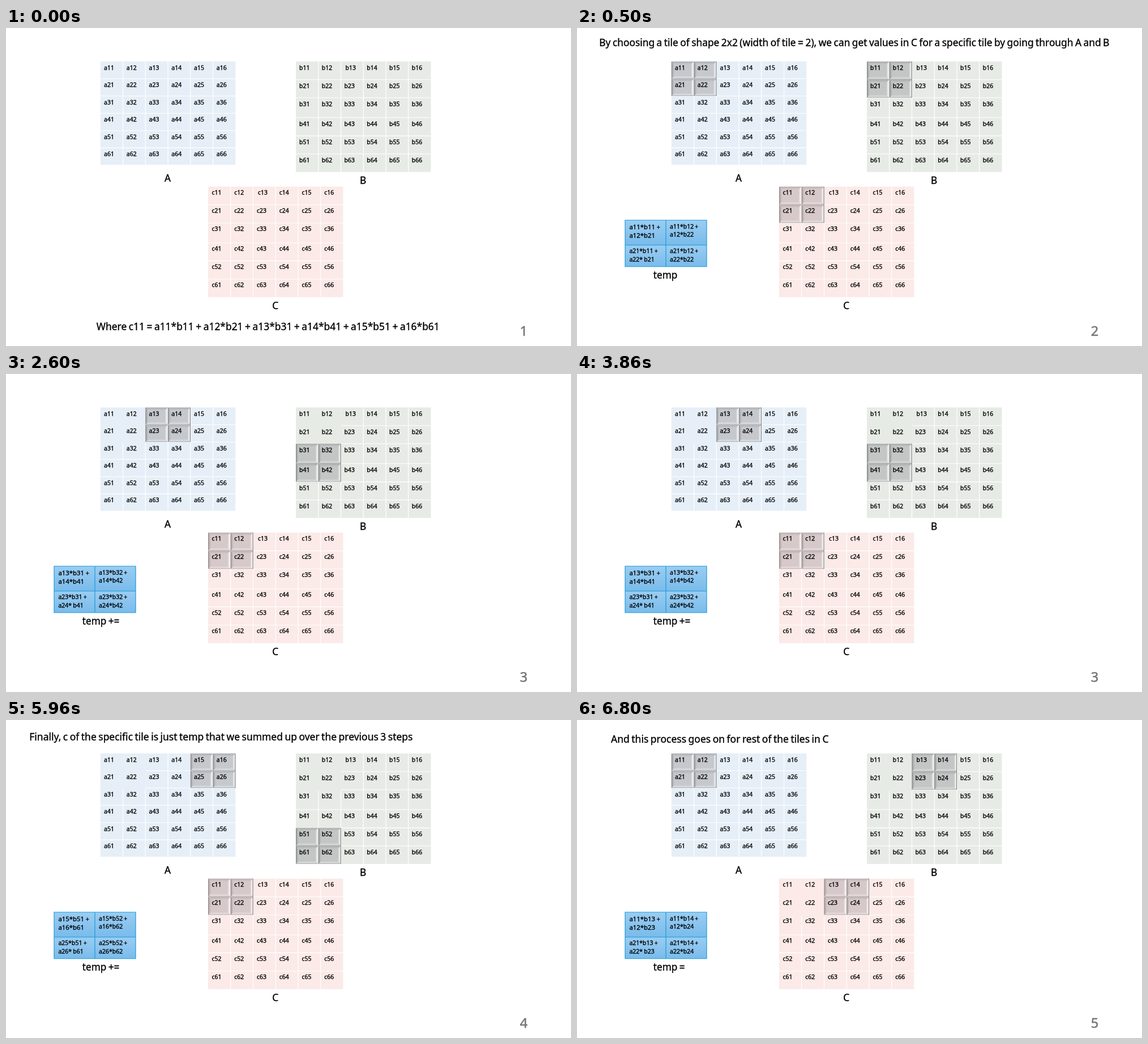
These frames come from a looping animation (998 by 561 pixels, 8000 ms). An HTML page:

```html
<!DOCTYPE html>
<html lang="en">
<head>
<meta charset="utf-8">
<title>Tiled matrix multiplication</title>
<style>
  html, body { margin: 0; width: 100%; height: 100%; overflow: hidden; background: #fff; }
  svg { display: block; width: 100%; height: 100%; }
  text {
    font-family: "Noto Sans", "Open Sans", sans-serif;
    white-space: pre; word-spacing: -.06em;
    stroke: #000; stroke-width: .35px;
  }
  .page { fill: #767676; stroke: #767676; stroke-width: .6px; }
</style>
</head>
<body>
<svg id="stage" viewBox="0 0 998 561" xmlns="http://www.w3.org/2000/svg">
  <defs>
    <linearGradient id="blue" x1="0" y1="0" x2="0" y2="1">
      <stop offset="0" stop-color="#9acdf3"/>
      <stop offset="1" stop-color="#79bbeb"/>
    </linearGradient>
    <linearGradient id="left">
      <stop offset="0" stop-color="#000" stop-opacity=".34"/>
      <stop offset=".5" stop-color="#000" stop-opacity=".1"/>
      <stop offset="1" stop-color="#000" stop-opacity=".02"/>
    </linearGradient>
    <linearGradient id="right">
      <stop offset="0" stop-color="#fff" stop-opacity=".1"/>
      <stop offset=".6" stop-color="#fff" stop-opacity=".75"/>
      <stop offset="1" stop-color="#fff" stop-opacity=".5"/>
    </linearGradient>
    <linearGradient id="top" x1="0" y1="0" x2="0" y2="1">
      <stop offset="0" stop-color="#000" stop-opacity=".12"/>
      <stop offset="1" stop-color="#000" stop-opacity=".01"/>
    </linearGradient>
    <linearGradient id="bottom" x1="0" y1="0" x2="0" y2="1">
      <stop offset="0" stop-color="#fff" stop-opacity=".05"/>
      <stop offset=".6" stop-color="#fff" stop-opacity=".4"/>
      <stop offset="1" stop-color="#777" stop-opacity=".35"/>
    </linearGradient>
  </defs>
  <g id="scene"></g>
</svg>
<script>
const LOOP = 8000;
const COL = 39.75;
const BEVEL = 5;

const grids = {
  a: { x: 166.8, rows: [59, 89.5, 120, 150.5, 181, 211.3, 241.3], fill: '#e6eff7', tile: '#c5c8cd', tx: 6.3, ty: 14.9, label: [285.5, 271.3] },
  b: { x: 512, rows: [59, 91, 123, 158, 190.3, 222, 254], fill: '#e7ebe6', tile: '#c3c6c5', tx: 6, ty: 14.7, label: [630.5, 275.3] },
  c: { x: 357, rows: [279.8, 311.8, 344, 379, 410.7, 443, 474.8], fill: '#fbeae8', tile: '#d7c9c9', tx: 6.5, ty: 14.2, label: [475.7, 496.3] }
};

// Tiles are [row, column] of the top left cell, counted from zero.
const scenes = [
  { start: 0, tiles: {},
    note: ['Where c11 = a11*b11 + a12*b21 + a13*b31 + a14*b41 + a15*b51 + a16*b61', 159.8, 533.2, 17.42] },
  { start: 500, tiles: { a: [0, 0], b: [0, 0], c: [0, 0] }, temp: 'temp',
    note: ['By choosing a tile of shape 2x2 (width of tile = 2), we can get values in C for a specific tile by going through A and B', 39.3, 32, 17.35] },
  { start: 2600, tiles: { a: [0, 2], b: [2, 0], c: [0, 0] }, plain: 'ab', temp: 'temp +=' },
  { start: 4700, tiles: { a: [0, 4], b: [4, 0], c: [0, 0] }, plain: 'ab', temp: 'temp +=',
    note: ['Finally, c of the specific tile is just temp that we summed up over the previous 3 steps', 41.3, 36.2, 17.48] },
  { start: 6800, tiles: { a: [0, 0], b: [0, 2], c: [0, 2] }, plain: 'bc', temp: 'temp =',
    note: ['And this process goes on for rest of the tiles in C', 60, 40, 17.5] }
];

const text = (s, x, y, size, extra = '') =>
  `<text x="${x}" y="${y}" font-size="${size}" ${extra}>${s}</text>`;
const rect = (x, y, w, h, fill) =>
  `<rect x="${x}" y="${y}" width="${w}" height="${h}" fill="${fill}"/>`;
const path = (d, stroke, width) =>
  `<path d="${d}" fill="none" stroke="${stroke}" stroke-width="${width}"/>`;
const poly = (points, fill) => `<polygon points="${points}" fill="url(#${fill})"/>`;

function bevelCell(x, y, w, h, fill) {
  const r = x + w, b = y + h, k = BEVEL;
  const il = x + k, it = y + k, ir = r - k, ib = b - k;
  return rect(x, y, w, h, fill) +
    poly([x, y, r, y, ir, it, il, it], 'top') +
    poly([x, y, il, it, il, ib, x, b], 'left') +
    poly([x, b, il, ib, ir, ib, r, b], 'bottom') +
    poly([r, y, r, b, ir, ib, ir, it], 'right');
}

function drawTile(g, [row, col]) {
  const x = g.x + col * COL, y = g.rows[row], r = x + 2 * COL, b = g.rows[row + 2];
  let out = '';
  for (let i = 0; i < 2; i++) {
    for (let j = 0; j < 2; j++) {
      const top = g.rows[row + i];
      out += bevelCell(x + j * COL, top, COL, g.rows[row + i + 1] - top, g.tile);
    }
  }
  return out + path(`M${r - .4} ${y}V${b}`, '#777', 1);
}

function drawGrid(name, scene) {
  const g = grids[name], { x, rows } = g;
  const w = 6 * COL, y = rows[0], end = rows[6];
  let out = rect(x, y, w, end - y, g.fill), lines = '';
  for (let i = 1; i < 6; i++) {
    lines += `M${x + i * COL} ${y}V${end}M${x} ${rows[i]}H${x + w}`;
  }
  out += path(lines, '#fff', 1.2);
  // A tile that has been left behind loses its grid lines.
  if (scene.plain && scene.plain.includes(name)) {
    out += rect(x, y, 2 * COL + .6, rows[2] - y + 2, g.fill);
  }
  if (scene.tiles[name]) out += drawTile(g, scene.tiles[name]);
  for (let i = 0; i < 6; i++) {
    for (let j = 0; j < 6; j++) {
      const nudge = i === 0 && j === 2 && name !== 'a' ? 2 : 0;
      const id = name === 'c' && i === 4 && j === 0 ? 'c52' : `${name}${i + 1}${j + 1}`;
      out += text(id, x + j * COL + g.tx + nudge, rows[i] + g.ty, 10.5);
    }
  }
  return out + text(name.toUpperCase(), ...g.label, 17.3, 'text-anchor="middle"');
}

function drawTemp({ tiles, temp }) {
  const [ar, ac] = tiles.a, [br, bc] = tiles.b;
  let out = rect(85, 339, 144, 44, 'url(#blue)') + rect(85, 383, 144, 38, 'url(#blue)') +
    path('M85 339H229V421H85ZM157 339V421M85 383H229', '#1f9bd7', 1.2);
  for (let i = 0; i < 2; i++) {
    for (let j = 0; j < 2; j++) {
      const a = `a${ar + i + 1}`, b = bc + j + 1;
      const first = !i && !j;
      const x = j ? 164 : 92.4;
      const y = i ? 397.4 : first ? 354.7 : 353.5;
      const size = first ? 11.4 : 10.5;
      const gap = i && !j ? ' ' : '';
      out += text(`${a}${ac + 1}*b${br + 1}${b} +`, x, y, size) +
        text(`${a}${ac + 2}*${gap}b${br + 2}${b}`, x, y + (first ? 14.9 : 14.1), size);
    }
  }
  return out + text(temp, 134.8, 442.2, 17.2);
}

function drawScene(index) {
  const scene = scenes[index];
  let out = rect(0, 0, 998, 561, '#fff');
  for (const name of 'abc') out += drawGrid(name, scene);
  if (scene.temp) out += drawTemp(scene);
  if (scene.note) out += text(...scene.note);
  return out + text(index + 1, 914.5, 543, 23.5, 'text-anchor="middle" class="page"');
}

const root = document.getElementById('scene');
let shown = -1;

function update() {
  const t = performance.now() % LOOP;
  const index = scenes.findLastIndex(s => t >= s.start);
  if (index !== shown) {
    root.innerHTML = drawScene(index);
    shown = index;
  }
  requestAnimationFrame(update);
}
update();
</script>
</body>
</html>
```
